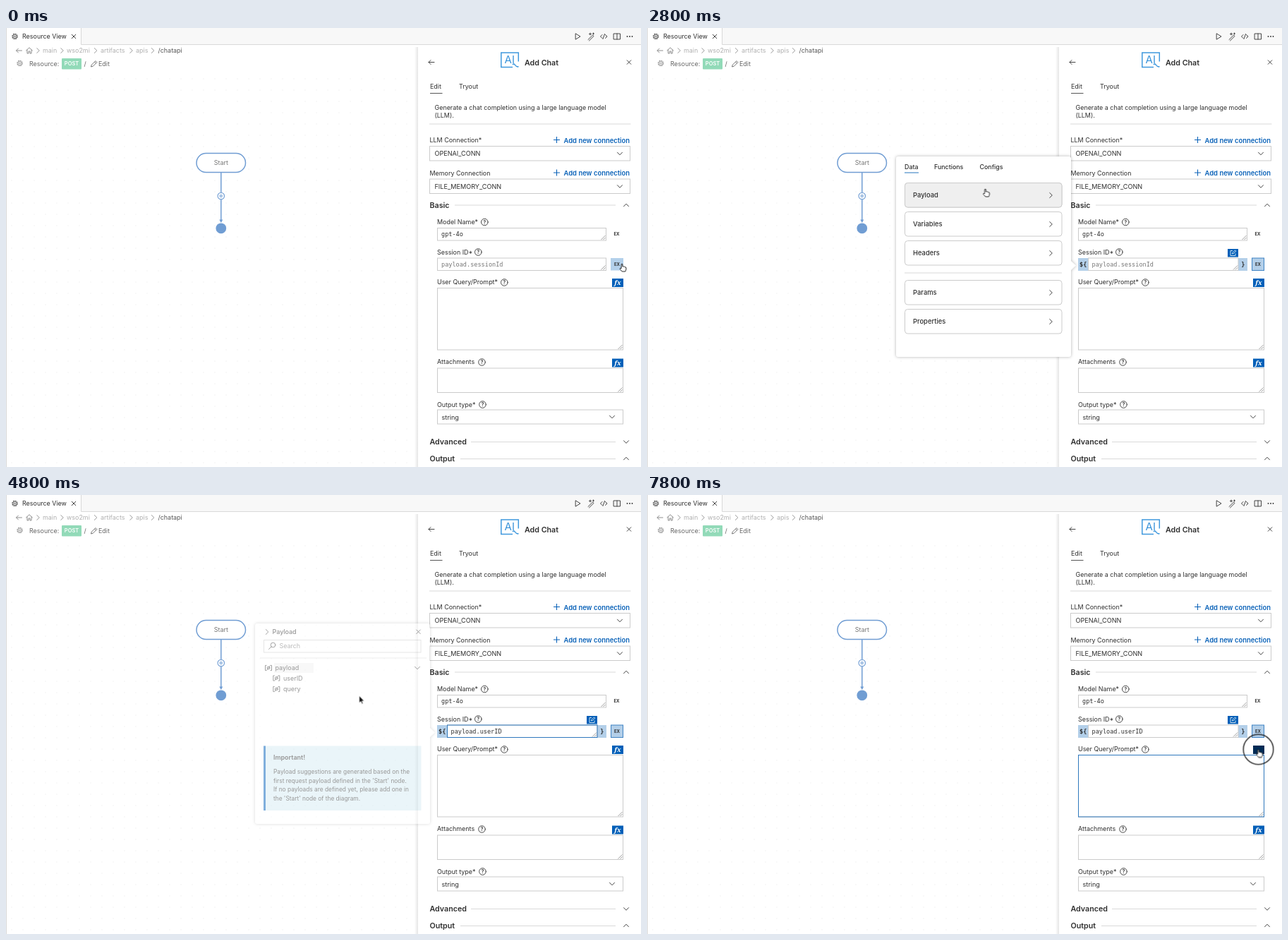
Recreate the animation shown at these times as an HTML page. Size 900 by 622 pixels, loop 8 s.

```html
<!DOCTYPE html>
<html lang="en">
<head>
<meta charset="utf-8">
<title>Add Chat</title>
<style>
html, body { margin: 0; width: 100%; height: 100%; overflow: hidden; background: #fff; }
svg { display: block; width: 100%; height: 100%; font: 8.95px Inter, sans-serif; fill: #2f2f2f; }
.line { fill: none; stroke: #444; stroke-width: 1; stroke-linecap: round; stroke-linejoin: round; }
.box { fill: #fff; stroke: #cbcbcb; }
.rule { fill: none; stroke: #d9d9d9; }
.blue { fill: #005fb8; }
.focus { fill: none; stroke: #2f78bd; }
.pale { fill: #b0b0b0; }
.mid { fill: #777; }
.bold { font-size: 10.7px; font-weight: 600; }
.link { font-size: 9.45px; font-weight: 600; fill: #0a62b8; }
.caps { font-size: 9.1px; }
.item { font-size: 9.4px; font-weight: 500; }
.mono { font: 8.55px "DejaVu Sans Mono", monospace; }
.tiny { font-size: 6px; font-weight: 700; text-anchor: middle; }
.shade { filter: drop-shadow(0 0 2px rgba(0, 0, 0, .3)); }

/* Everything advances in 200 ms ticks (2.5%). */
.t { animation: 8s step-end infinite; }
.plain { animation-name: plain; }
.expr { animation-name: expr; }
.hint { animation-name: hint; }
.value { animation-name: value; }
.field { animation-name: field; }
.popup { animation-name: popup; }
.list { animation-name: list; }
.hover { animation-name: hover; }
.tree { animation-name: tree; }
.suggest { animation-name: suggest; }
.area { animation-name: area; }
.caret { animation-name: caret; }
.fxhover { animation-name: fxhover; }
.cursor { animation-name: move; }
.hand { animation-name: hand; }
.arrow { animation-name: arrow; }
.beam { animation-name: beam; }
.ring { animation-name: ring; }
.wide { animation-name: wide; }
@keyframes plain { 0% { opacity: 1 } 5%, 100% { opacity: 0 } }
@keyframes expr { 0% { opacity: 0 } 5%, 100% { opacity: 1 } }
@keyframes hint { 0% { opacity: 1 } 57.5%, 100% { opacity: 0 } }
@keyframes value { 0% { opacity: 0 } 57.5%, 100% { opacity: 1 } }
@keyframes field { 0% { opacity: 0 } 57.5% { opacity: 1 } 77.5%, 100% { opacity: 0 } }
@keyframes popup { 0% { opacity: 0 } 20% { opacity: 1 } 60% { opacity: .5 } 62.5%, 100% { opacity: 0 } }
@keyframes list { 0% { opacity: 1 } 40%, 100% { opacity: 0 } }
@keyframes hover { 0% { opacity: 0 } 30%, 100% { opacity: 1 } }
@keyframes tree { 0% { opacity: 0 } 40%, 100% { opacity: 1 } }
@keyframes suggest { 0% { opacity: 0 } 62.5% { opacity: 1 } 67.5% { opacity: .7 } 70%, 100% { opacity: 0 } }
@keyframes area { 0% { opacity: 0 } 77.5%, 100% { opacity: 1 } }
@keyframes caret { 0% { opacity: 0 } 77.5% { opacity: 1 } 85% { opacity: 0 } 90% { opacity: 1 } 95%, 100% { opacity: 0 } }
@keyframes fxhover { 0% { opacity: 0 } 90%, 100% { opacity: 1 } }
@keyframes hand { 0% { opacity: 1 } 42.5% { opacity: 0 } 52.5% { opacity: 1 } 60% { opacity: 0 } 87.5%, 100% { opacity: 1 } }
@keyframes arrow { 0% { opacity: 0 } 42.5% { opacity: 1 } 52.5% { opacity: 0 } 60% { opacity: 1 } 70%, 100% { opacity: 0 } }
@keyframes beam { 0% { opacity: 0 } 70% { opacity: 1 } 87.5%, 100% { opacity: 0 } }
@keyframes ring {
  0% { opacity: 0 } 2.5% { opacity: 1 } 5% { opacity: 0 } 17.5% { opacity: 1 } 20% { opacity: 0 }
  37.5% { opacity: 1 } 40% { opacity: 0 } 55% { opacity: 1 } 57.5% { opacity: 0 } 77.5% { opacity: 1 } 80%, 100% { opacity: 0 }
}
@keyframes wide { 0% { opacity: 0 } 97.5%, 100% { opacity: 1 } }
@keyframes move {
  0% { transform: translate(873px, 334px) }
  5% { transform: translate(873px, 334px); animation-timing-function: steps(3) }
  12.5% { transform: translate(827.5px, 319px) }
  20% { transform: translate(827.5px, 319px); animation-timing-function: steps(4) }
  30% { transform: translate(479.5px, 228px) }
  40% { transform: translate(479.5px, 228px); animation-timing-function: steps(4) }
  50% { transform: translate(435.5px, 241.5px); animation-timing-function: steps(1) }
  52.5% { transform: translate(412px, 258px) }
  57.5% { transform: translate(412px, 258px); animation-timing-function: steps(4) }
  67.5% { transform: translate(766.5px, 364px); animation-timing-function: steps(3) }
  75% { transform: translate(779px, 424px) }
  80% { transform: translate(779px, 424px); animation-timing-function: steps(4) }
  90%, 100% { transform: translate(866.5px, 360.5px) }
}
</style>
</head>
<body>
<svg viewBox="0 0 900 622" preserveAspectRatio="none">
<defs>
  <pattern id="dots" width="16" height="16" patternUnits="userSpaceOnUse"><circle cx="8" cy="8" r=".7" fill="#efefef"/></pattern>
  <linearGradient id="edge"><stop offset="0" stop-color="#fff"/><stop offset="1" stop-color="#e5e5e5"/></linearGradient>
  <path id="down" class="line" d="M-3.5-1.8 0 1.8 3.5-1.8"/>
  <path id="up" class="line" d="M-3.5 1.8 0-1.8 3.5 1.8"/>
  <path id="next" class="line" d="M-1.8-3.5 1.8 0-1.8 3.5"/>
  <path id="close" class="line" d="M-2.8-2.8 2.8 2.8M2.8-2.8-2.8 2.8"/>
  <path id="back" class="line" d="M4 0H-4M-1-3-4 0-1 3"/>
  <path id="grip" d="M-6 0 0-6M-3 0 0-3" fill="none" stroke="#777" stroke-width=".7"/>
  <path id="plus" d="M-4.5 0H4.5M0-4.5V4.5" fill="none" stroke="#0a62b8" stroke-width="1.1"/>
  <g id="help"><circle r="4.8" class="line" stroke-width=".9"/><text y="2.6" font-size="7.3" font-weight="600" text-anchor="middle">?</text></g>
  <g id="gear" fill="none" stroke="#555"><circle r="3.6" stroke-width="1.3" stroke-dasharray="1.9 .9"/><circle r="2.6" stroke-width=".8"/><circle r=".9" stroke-width=".8"/></g>
  <g id="fx"><rect x="-8" y="-6" width="16" height="12" class="blue"/><text y="3" fill="#fff" text-anchor="middle" style="font:italic 600 9.5px 'Noto Serif',serif">fx</text></g>
  <g id="node"><path d="M-3-3.6H-4.5V3.6H-3M3-3.6H4.5V3.6H3M2.2-3-2.2 3" class="line" stroke-width=".8"/><circle r="1.9" class="line" stroke-width=".8"/></g>
  <path id="pencil" d="M-4 4-3.2 1.2 2.4-4.4 4.4-2.4-1.2 3.2ZM1-3 3-1" fill="none" stroke="#666" stroke-width=".9"/>
</defs>

<rect width="900" height="622" fill="#fff"/>
<rect y="60" width="583" height="562" fill="url(#dots)"/>

<!-- tab bar -->
<rect width="900" height="23" fill="#f8f8f8"/>
<path d="M106.5 0V23.5H900" class="rule" stroke="#e5e5e5"/>
<rect width="106" height="24" fill="#fff"/>
<path d="M.5 0V622" class="rule" stroke="#e5e5e5"/>
<use href="#gear" x="12.5" y="12"/>
<text x="23" y="15.2">Resource View</text>
<use href="#close" x="96" y="12"/>
<g class="line">
  <path d="M807.5 8 814 12 807.5 16ZM825 16.5 831.5 10 833 11.5 826.5 18M828 7V10M826.5 8.5H829.5M832.5 7V9M831.5 8H833.5M845 9.5 842.5 12 845 14.5M849.5 9.5 852 12 849.5 14.5M848.5 8.5 846 15.5M861.5 8H870.5V16H861.5ZM866 8V16"/>
</g>
<g><circle cx="880.5" cy="12" r=".9"/><circle cx="884" cy="12" r=".9"/><circle cx="887.5" cy="12" r=".9"/></g>

<!-- breadcrumb -->
<g opacity=".6"><use href="#back" x="18.5" y="32"/><path class="line" d="M28.5 32 33 27.8 37.5 32M30 31V36H32V33H34V36H36V31"/></g>
<g opacity=".55"><use href="#next" x="45.5" y="32"/><use href="#next" x="79.5" y="32"/><use href="#next" x="127" y="32"/><use href="#next" x="177.5" y="32"/><use href="#next" x="208" y="32"/></g>
<g class="pale"><text x="52" y="35.2">main</text><text x="86" y="35.2">wso2mi</text><text x="134" y="35.2">artifacts</text><text x="184" y="35.2">apis</text></g>
<text x="215.5" y="35.2" fill="#555">/chatapi</text>
<use href="#gear" x="19.5" y="50" opacity=".6"/>
<g fill="#666"><text x="33" y="54">Resource:</text><text x="110.5" y="54">/</text><text x="131" y="54">Edit</text></g>
<rect x="79" y="43" width="28" height="15.5" rx="1" fill="#92dab8"/>
<text x="93" y="53.4" font-size="7.5" font-weight="600" fill="#fff" text-anchor="middle">POST</text>
<use href="#pencil" x="124.5" y="51"/>

<!-- diagram -->
<g stroke="#709dd3" stroke-width="1.5" fill="#fff">
  <rect x="270" y="177.5" width="69.5" height="27" rx="13.5"/>
  <path d="M304.8 205V274"/>
  <circle cx="304.8" cy="238" r="4.8" stroke-width="1.1"/>
  <path d="M302 238H307.600M304.8 235.2V240.8" stroke-width="1"/>
  <path d="M302.300 271.500H307.300L304.800 276Z" fill="#709dd3" stroke="none"/>
  <circle cx="304.800" cy="283.800" r="7.400" fill="#709dd3" stroke="none"/>
</g>
<text x="304.800" y="194.300" class="mid" text-anchor="middle">Start</text>

<!-- side panel -->
<rect x="579" y="27" width="5" height="595" fill="url(#edge)"/>
<rect x="584" y="25" width="316" height="597" fill="#fff"/>
<use href="#back" x="603" y="48.500"/>
<g fill="none" stroke="#4099dd" stroke-width="1.500"><path d="M718 55.500H701.800V35H726.300V47.500"/><path d="M718 52C721 48 722 57 726.500 54.500"/></g>
<text x="713.800" y="49.800" font-size="15" fill="#3b94da" text-anchor="middle">AI</text>
<text x="735" y="52.500" class="bold">Add Chat</text>
<use href="#close" x="883" y="48.500"/>
<text x="601" y="86">Edit</text><text x="642" y="86">Tryout</text>
<path d="M601 92.500H618.500" stroke="#555"/>
<text x="607.500" y="116.200">Generate a chat completion using a large language model</text>
<text x="607.500" y="126.800">(LLM).</text>
<path d="M600 136H885.500" class="rule" stroke="#ccc"/>

<text x="600.500" y="162.200">LLM Connection*</text><use href="#plus" x="780.500" y="158.500"/><text x="790.500" y="162.500" class="link">Add new connection</text>
<rect x="600.500" y="167.500" width="284" height="20.500" class="box"/><text x="607.500" y="181.200" class="caps">OPENAI_CONN</text><use href="#down" x="870" y="178"/>
<text x="600.500" y="208.700">Memory Connection</text><use href="#plus" x="780.500" y="205"/><text x="790.500" y="209" class="link">Add new connection</text>
<rect x="600.500" y="214" width="284" height="20.500" class="box"/><text x="607.500" y="227.700" class="caps">FILE_MEMORY_CONN</text><use href="#down" x="870" y="224.500"/>

<g class="bold"><text x="600.500" y="255">Basic</text><text x="600.500" y="590.300">Advanced</text><text x="600.500" y="614.300">Output</text></g>
<path d="M636 251H864M659 586.500H864M644 610.500H864" class="rule"/>
<use href="#up" x="879" y="251"/><use href="#down" x="879" y="586.500"/><use href="#up" x="879" y="610"/>

<text x="611" y="278">Model Name*</text><use href="#help" x="678.300" y="275"/>
<rect x="611.500" y="283.500" width="239" height="17.500" class="box"/><text x="617" y="295.300" class="mono">gpt-4o</text><use href="#grip" x="849.500" y="300"/>
<text x="865.500" y="294.300" class="tiny">EX</text>

<text x="611" y="320.500">Session ID*</text><use href="#help" x="669.300" y="317.500"/>
<g class="t plain">
  <rect x="611.500" y="326" width="239" height="17.500" class="box"/>
  <text x="617" y="338" class="mono mid">payload.sessionId</text><use href="#grip" x="849.500" y="342.500"/>
  <rect x="857" y="326" width="18" height="17.500" fill="#b3d0eb"/>
</g>
<g class="t expr">
  <rect x="611" y="326" width="240" height="18" fill="#b3cfe9"/>
  <rect x="625.500" y="326" width="212.500" height="17.500" class="box"/>
  <g class="mono" font-weight="700" style="font-weight:700"><text x="613" y="338">${</text><text x="842.300" y="338">}</text></g>
  <g class="mono"><text x="630.500" y="338" class="mid t hint">payload.sessionId</text><text x="630.500" y="338" class="t value">payload.userID</text></g>
  <rect x="625.500" y="326" width="212.500" height="17.500" class="focus t field"/>
  <use href="#grip" x="837" y="342.500"/>
  <rect x="857.500" y="326" width="17" height="17.500" fill="#b3cfe9" stroke="#3f83c4"/>
  <rect x="823" y="313" width="15" height="11.500" class="blue"/>
  <path d="M830 315.500H827V322.500H834V319.500M829.500 320 830 318.300 833.500 314.800 834.800 316.100 831.300 319.600Z" fill="none" stroke="#fff" stroke-width=".8"/>
</g>
<text x="866" y="336.800" class="tiny">EX</text>

<text x="611" y="363">User Query/Prompt*</text><use href="#help" x="706.300" y="360.500"/><use href="#fx" x="867" y="361"/>
<rect x="859" y="355" width="16" height="12" fill="#002b55" opacity=".5" class="t fxhover"/>
<rect x="611.500" y="368.500" width="263" height="87.500" class="box"/>
<g class="t area"><rect x="611.500" y="368.500" width="263" height="87.500" class="focus"/></g>
<path d="M617.500 373.500V384" stroke="#222" class="t caret"/>
<use href="#grip" x="873.500" y="455"/>
<text x="611" y="476.300">Attachments</text><use href="#help" x="674.500" y="473.500"/><use href="#fx" x="867" y="474.500"/>
<rect x="611.500" y="482" width="263" height="34.500" class="box"/><use href="#grip" x="873.500" y="515.500"/>
<text x="611" y="536.500">Output type*</text><use href="#help" x="675.500" y="533.500"/>
<rect x="611.500" y="541" width="263" height="20" class="box"/><text x="617.500" y="554.500" class="caps">string</text><use href="#down" x="859" y="551"/>

<!-- expression helper -->
<g class="t popup">
  <path class="shade" fill="#fff" d="M356 182H598Q601 182 601 185V330L608 336.500 601 343V463Q601 466 598 466H356Q353 466 353 463V185Q353 182 356 182Z"/>
  <g class="t list">
    <g font-size="8.850" font-weight="500"><text x="365" y="199.800">Data</text><text x="407" y="199.800">Functions</text><text x="471.500" y="199.800">Configs</text></g>
    <path d="M365 205H385" stroke="#4a8cc8" stroke-width="1.200"/>
    <g class="box" stroke="#d3d3d3">
      <rect x="365.500" y="219.500" width="222.500" height="34.500" rx="4"/>
      <rect x="365.500" y="219.500" width="222.500" height="34.500" rx="4" fill="#efefef" class="t hover"/>
      <rect x="365.500" y="260.500" width="222.500" height="34.500" rx="4"/>
      <rect x="365.500" y="301.500" width="222.500" height="34.500" rx="4"/>
      <rect x="365.500" y="357.500" width="222.500" height="34.500" rx="4"/>
      <rect x="365.500" y="398.500" width="222.500" height="34.500" rx="4"/>
    </g>
    <path d="M365 347H588" class="rule" stroke="#e6e6e6"/>
    <g class="item"><text x="377" y="240.300">Payload</text><text x="377" y="281.300">Variables</text><text x="377" y="322.300">Headers</text><text x="377" y="378.300">Params</text><text x="377" y="419.300">Properties</text></g>
    <use href="#next" x="572.500" y="237"/><use href="#next" x="572.500" y="278"/><use href="#next" x="572.500" y="319"/><use href="#next" x="572.500" y="375"/><use href="#next" x="572.500" y="416"/>
  </g>
  <g class="t tree">
    <use href="#next" x="370" y="194"/><text x="377.500" y="197.200" font-weight="500">Payload</text><use href="#close" x="584.500" y="193.800"/>
    <rect x="365.500" y="205.500" width="222.500" height="17.500" class="box" stroke="#c4d0d6"/>
    <circle cx="378.500" cy="212.500" r="3.300" class="line"/><path d="M376 215 372.500 218.500" class="line"/>
    <text x="387.500" y="217.300" class="mid">Search</text>
    <path d="M360 231H596" class="rule"/>
    <rect x="380" y="238" width="56" height="14" fill="#f1f1f1"/>
    <use href="#node" x="372" y="245"/><use href="#node" x="383.300" y="259.500"/><use href="#node" x="383.300" y="275"/>
    <text x="381.500" y="248.300">payload</text><text x="393" y="262.500">userID</text><text x="393" y="278">query</text>
    <use href="#down" x="583" y="245"/>
    <rect x="365" y="355.500" width="223.500" height="91.500" fill="#d5ebf2"/><rect x="365" y="355.500" width="3" height="91.500" class="blue"/>
    <text x="379" y="375" font-weight="600">Important!</text>
    <g font-size="8.350"><text x="379" y="395">Payload suggestions are generated based on the</text><text x="379" y="407.700">first request payload defined in the 'Start' node.</text><text x="379" y="420.300">If no payloads are defined yet, please add one in</text><text x="379" y="433">the 'Start' node of the diagram.</text></g>
  </g>
</g>

<!-- completion list -->
<g class="t suggest">
  <path d="M623.500 350.500H872V394H623.500Z" fill="#fff" class="shade"/>
  <use href="#close" x="868" y="348.800"/>
  <path d="M634 357H640V362H634ZM632 359V364H637" class="line" stroke-width=".9"/>
  <text x="646" y="363" class="mono" style="font-size:9px;font-weight:700">userID</text>
  <g class="box"><rect x="630.500" y="375.500" width="12" height="11.500" rx="1"/><rect x="651" y="375.500" width="12" height="11.500" rx="1"/><rect x="719" y="375.500" width="28" height="11.500" rx="1"/><rect x="793" y="375.500" width="18.500" height="11.500" rx="1"/></g>
  <path d="M636.500 384V378.500M634.800 380.200 636.500 378.500 638.200 380.200M657 378.500V384M655.300 382.300 657 384 658.700 382.300" class="line" stroke-width=".8"/>
  <g class="tiny" style="font-size:6.700px"><text x="733" y="383.700">ENTER</text><text x="802.300" y="383.700">ESC</text></g>
  <g font-size="8.200" fill="#555"><text x="645.500" y="384">,</text><text x="667" y="384">to navigate.</text><text x="751" y="384">to select.</text><text x="815" y="384">to cancel.</text></g>
</g>

<!-- pointer -->
<g class="t cursor">
  <g class="t hand"><path fill="#fff" stroke="#111" stroke-width=".9" stroke-linejoin="round" d="M-.9 6.500V.700Q0-.500.900.700V4Q2 3.300 2.600 4.200 3.700 3.700 4.200 4.700 5.800 4.300 5.900 6V8Q5.500 9.500 4.800 11H.200Q-1 9.300-3 7.500-3.300 5.800-.9 6.500Z"/></g>
  <g class="t arrow"><path fill="#111" stroke="#fff" stroke-width=".7" d="M0 0V10L2.300 8 3.900 11.500 5.400 10.800 3.900 7.400H7Z"/></g>
  <g class="t beam"><path class="line" stroke="#111" d="M-2-5Q0-5 0-3.500 0-5 2-5M0-4V4M-2 5Q0 5 0 3.500 0 5 2 5M-1.300 1H1.300"/></g>
  <circle r="11.800" fill="none" stroke="#111" stroke-width="1.300" class="t ring"/>
  <circle r="21.300" fill="none" stroke="#111" stroke-width="1.300" class="t wide"/>
</g>
</svg>
</body>
</html>
```
